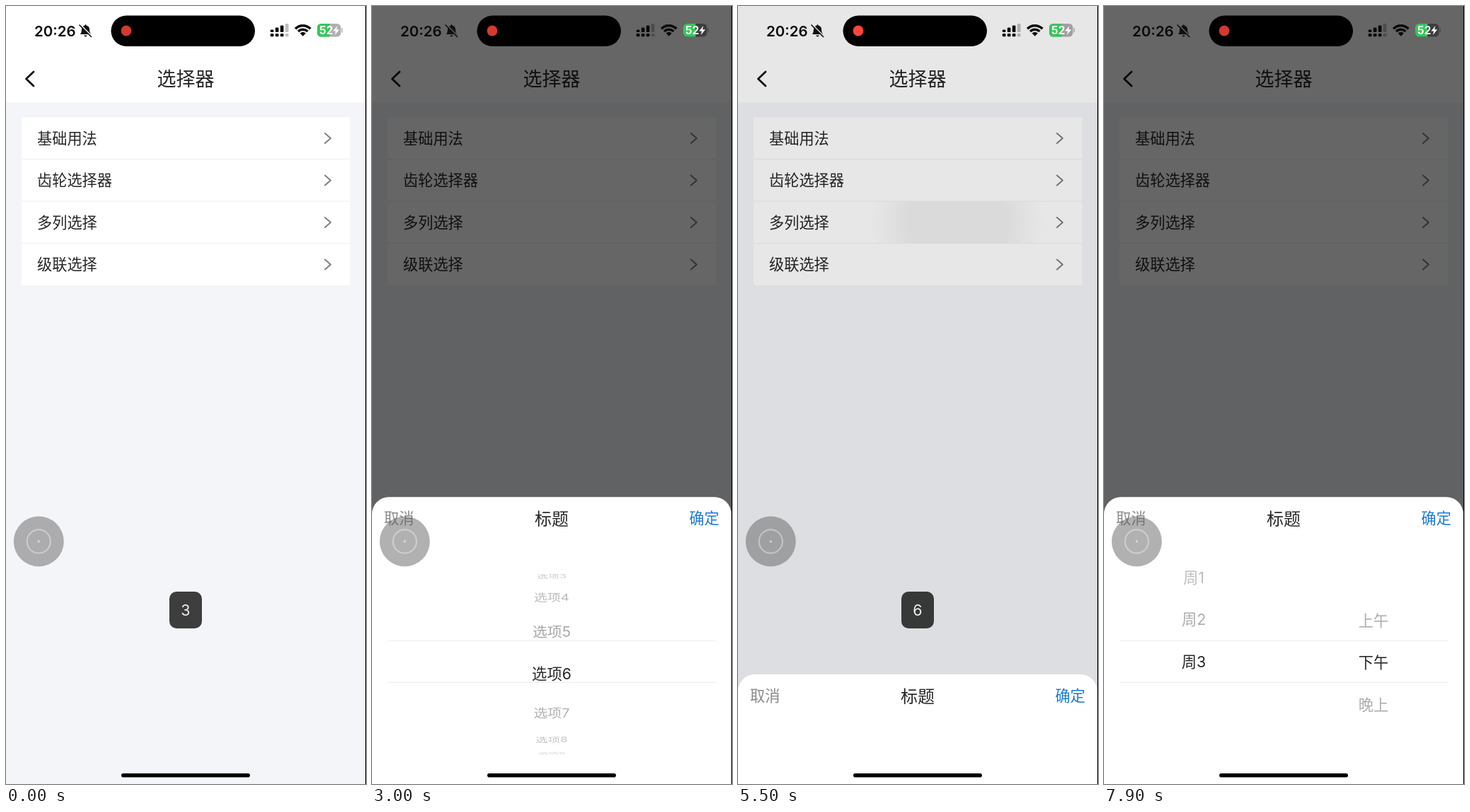
Write an HTML page with a canvas that moves like this. It is 509x1100 px and loops after 8000 ms.

```html
<!DOCTYPE html>
<html lang="zh-CN">
<head>
<meta charset="utf-8">
<style>
  html, body { margin: 0; width: 100%; height: 100%; overflow: hidden; background: #fff; }
  canvas { display: block; }
</style>
</head>
<body>
<canvas id="stage" width="509" height="1100"></canvas>
<script>
const ctx = document.getElementById('stage').getContext('2d');
const LOOP = 8000, W = 508, H = 1100;
const SHEET_TOP = 694.2, WHEEL_Y = 927, ITEM_H = 59.5;
const FONT = 'Inter, "Noto Sans CJK SC", "Noto Sans CJK", sans-serif';
const INK = '#262626';

const clamp = v => Math.max(0, Math.min(1, v));
const progress = (t, start, length) => clamp((t - start) / length);
const easeOut = p => 1 - (1 - p) ** 2;

// Same curve as CSS cubic-bezier(x1, y1, x2, y2), solved by bisection
function bezier(x1, y1, x2, y2) {
  const at = (s, a, b) => 3 * (1 - s) ** 2 * s * a + 3 * (1 - s) * s * s * b + s ** 3;
  return x => {
    let low = 0, high = 1;
    for (let i = 0; i < 24; i++) {
      const mid = (low + high) / 2;
      if (at(mid, x1, x2) < x) low = mid; else high = mid;
    }
    return at(high, y1, y2);
  };
}
const decelerate = bezier(0, 0, 0.2, 1);
const ease = bezier(0.25, 0.1, 0.25, 1);

function text(str, x, y, size, color, align = 'left', weight = 400) {
  ctx.font = `${weight} ${size}px ${FONT}`;
  ctx.textAlign = align;
  ctx.fillStyle = color;
  ctx.fillText(str, x, y + size * 0.375);
}

function box(x, y, w, h, r, color) {
  ctx.fillStyle = color;
  ctx.beginPath();
  ctx.roundRect(x, y, w, h, r);
  ctx.fill();
}

function disc(x, y, r, color) {
  ctx.fillStyle = color;
  ctx.beginPath();
  ctx.arc(x, y, r, 0, 7);
  ctx.fill();
}

function stroke(path, color, width) {
  ctx.strokeStyle = color;
  ctx.lineWidth = width;
  ctx.stroke(new Path2D(path));
}

function fillPath(path, color) {
  ctx.fillStyle = color;
  ctx.fill(new Path2D(path));
}

// Touch feedback spreading inside one list row
function ripple(t, row, x, start) {
  if (t < start || t > start + 450) return;
  const age = t - start, radius = 20 + age * 1.35;
  const top = 157.5 + row * 59.4;
  const alpha = 0.06 * (1 - progress(age, 230, 220));
  const shade = ctx.createRadialGradient(x, top + 30, radius * 0.55, x, top + 30, radius);
  shade.addColorStop(0, `rgba(0,0,0,${alpha})`);
  shade.addColorStop(1, 'rgba(0,0,0,0)');
  box(22, top, 464.5, 59.4, 0, shade);
}

function drawPage(t) {
  box(0, 0, W, H, 0, '#f4f5f8');
  box(0, 0, W, 136.5, 0, '#fff');
  stroke('M39 93 L28.5 103 L39 113', '#151515', 2.8);
  text('选择器', 254, 103, 27, INK, 'center');
  box(22, 157.5, 464.5, 237.5, 0, '#fff');
  ripple(t, 1, 310, 410);
  ripple(t, 2, 310, 5425);
  ['基础用法', '齿轮选择器', '多列选择', '级联选择'].forEach((label, i) => {
    const y = 187 + i * 59.5;
    text(label, 44, y, 21.2, INK);
    stroke(`M451 ${y - 7} l8 7 l-8 7`, '#7d7d7f', 1.9);
    if (i) box(22, y - 30.5, 464.5, 1, 0, '#efeff1');
  });
}

const itemAlpha = d => d < 0.5 ? 1 : Math.max(0.15, 0.46 - 0.08 * d);

function drawWheel(pos) {
  for (let i = 0; i < 12; i++) {
    const d = i - pos, bend = 0.052 * d * d;
    if (Math.abs(d) > 3.5) continue;
    ctx.save();
    ctx.globalAlpha = itemAlpha(Math.abs(d));
    ctx.translate(254, WHEEL_Y + 61.5 * d / (1 + bend));
    ctx.scale(1 / (1 + 0.045 * d * d), (1 - bend) / (1 + bend) ** 2);
    text('选项' + (i + 1), 0, 0, 21.4, INK, 'center');
    ctx.restore();
  }
}

function drawColumn(labels, x, pos) {
  labels.forEach((label, i) => {
    const d = i - pos;
    if (Math.abs(d) > 2.4) return;
    ctx.save();
    ctx.globalAlpha = itemAlpha(Math.abs(d));
    text(label, x, WHEEL_Y + d * ITEM_H, 21.2, INK, 'center');
    ctx.restore();
  });
}

function drawSheet(t, open, dim) {
  if (dim > 0) box(0, 0, W, H, 0, `rgba(0,0,0,${0.6 * dim})`);
  if (open <= 0) return;
  ctx.save();
  ctx.translate(0, (H - SHEET_TOP) * (1 - open));
  box(0, SHEET_TOP, W, H - SHEET_TOP, [24, 24, 0, 0], '#fff');
  text('取消', 17, 724, 21.2, '#8b8b8b');
  text('标题', 254, 725, 24, INK, 'center');
  text('确定', 491, 724, 21.2, '#1a78d6', 'right');
  box(22, 897, 465, 1, 0, '#eee');
  box(22, 956, 465, 1, 0, '#eee');
  if (t < 4500) {
    drawWheel(5 * easeOut(progress(t, 1700, 1710)));
  } else {
    drawColumn(['周1', '周2', '周3'], 127, 2 * easeOut(progress(t, 6600, 900)));
    drawColumn(['上午', '下午', '晚上'], 381, easeOut(progress(t, 7270, 735)));
  }
  ctx.restore();
}

function drawToast(label, t, shown) {
  const alpha = easeOut(progress(t, shown, 200)) * (1 - progress(t, shown + 2000, 200));
  if (alpha <= 0) return;
  ctx.save();
  ctx.globalAlpha = alpha;
  box(231, 828, 46, 52, 10, 'rgba(0,0,0,.75)');
  text(label, 254, 854, 21.5, '#efefef', 'center');
  ctx.restore();
}

function drawBell(dim) {
  const gray = 255 * (1 - 0.6 * dim);
  fillPath('M105 40 Q107 37.5 107 33 Q107 28.5 111 27.7 Q112.5 25 114 27.7 Q118 28.5 118 33 Q118 37.5 120 40 Z', '#111');
  fillPath('M110 41.5 h5 q-2.5 4 -5 0 Z', '#111');
  stroke('M105 26.5 L121.5 43', `rgb(${gray},${gray},${gray})`, 2);
  stroke('M104 27 L120.5 43.5', '#111', 1.7);
}

function drawStatus(t, dim) {
  const faint = 'rgba(0,0,0,.25)';
  text('20:26', 40, 35, 20.5, '#0a0a0a', 'left', 600);
  drawBell(dim);
  box(148.5, 13.5, 203.5, 43.5, 21.75, '#000');
  const glow = 0.91 + 0.09 * Math.cos((t - 5550) / 1600 * 2 * Math.PI);
  disc(170, 35, 7.4, `rgb(${255 * glow},${69 * glow},${57 * glow})`);

  [3.5, 6.5, 9.5, 12].forEach((h, i) => {
    const color = i < 3 ? '#0a0a0a' : faint;
    box(373.8 + i * 7, 37 - h, 4.7, h, 1.2, color);
    box(373.8 + i * 7, 39, 4.7, 4.3, 1.2, color);
  });

  ctx.lineCap = 'butt';
  ctx.strokeStyle = '#0a0a0a';
  [[14.8, 3.6], [9.3, 3.4]].forEach(([r, width]) => {
    ctx.lineWidth = width;
    ctx.beginPath();
    ctx.arc(419.8, 42.5, r, -Math.PI * 0.755, -Math.PI * 0.245);
    ctx.stroke();
  });
  fillPath('M419.8 42.8 L415.7 38.4 Q419.8 35 423.9 38.4 Z', '#0a0a0a');

  ctx.save();
  ctx.beginPath();
  ctx.roundRect(440, 25, 33.5, 18.5, 5.5);
  ctx.clip();
  box(440, 25, 34, 19, 0, dim > 0.5 ? 'rgba(0,0,0,.4)' : 'rgba(0,0,0,.31)');
  box(440, 25, 17.5, 19, 0, '#34c759');
  ctx.restore();
  box(474.3, 31, 1.8, 6.5, 1, faint);
  text('52', 443, 34.5, 15.5, '#fff', 'left', 700);
  fillPath('M468.5 28 L462.5 35.5 H466.3 L465 41 L471.3 33.2 H467.3 Z', '#fff');
}

function drawTouchButton() {
  disc(46.3, 757, 35.5, 'rgba(89,89,89,.47)');
  ctx.strokeStyle = 'rgba(255,255,255,.36)';
  ctx.lineWidth = 2.2;
  ctx.beginPath();
  ctx.arc(46.3, 757, 16.6, 0, 7);
  ctx.stroke();
  disc(46.3, 757, 1.7, 'rgba(255,255,255,.5)');
}

// The sheet enters in 250 ms and runs the same curves backwards in 200 ms
function sheetState(t) {
  const first = t < 4500;
  const phase = progress(t, first ? 450 : 5467, 250) - (first ? progress(t, 4030, 200) : 0);
  return { open: decelerate(phase), dim: ease(phase) };
}

function draw(t) {
  const { open, dim } = sheetState(t);
  ctx.clearRect(0, 0, 509, H);
  ctx.lineCap = ctx.lineJoin = 'round';
  drawPage(t);
  drawSheet(t, open, dim);
  drawToast('3', t, -400);
  drawToast('6', t, 4180);
  drawTouchButton();
  drawStatus(t, dim);
  box(163, 1085, 182, 5.6, 2.8, '#000');
  box(W, 0, 1, H, 0, '#000');
}

function tick() {
  draw(performance.now() % LOOP);
  requestAnimationFrame(tick);
}
tick();
</script>
</body>
</html>
```
